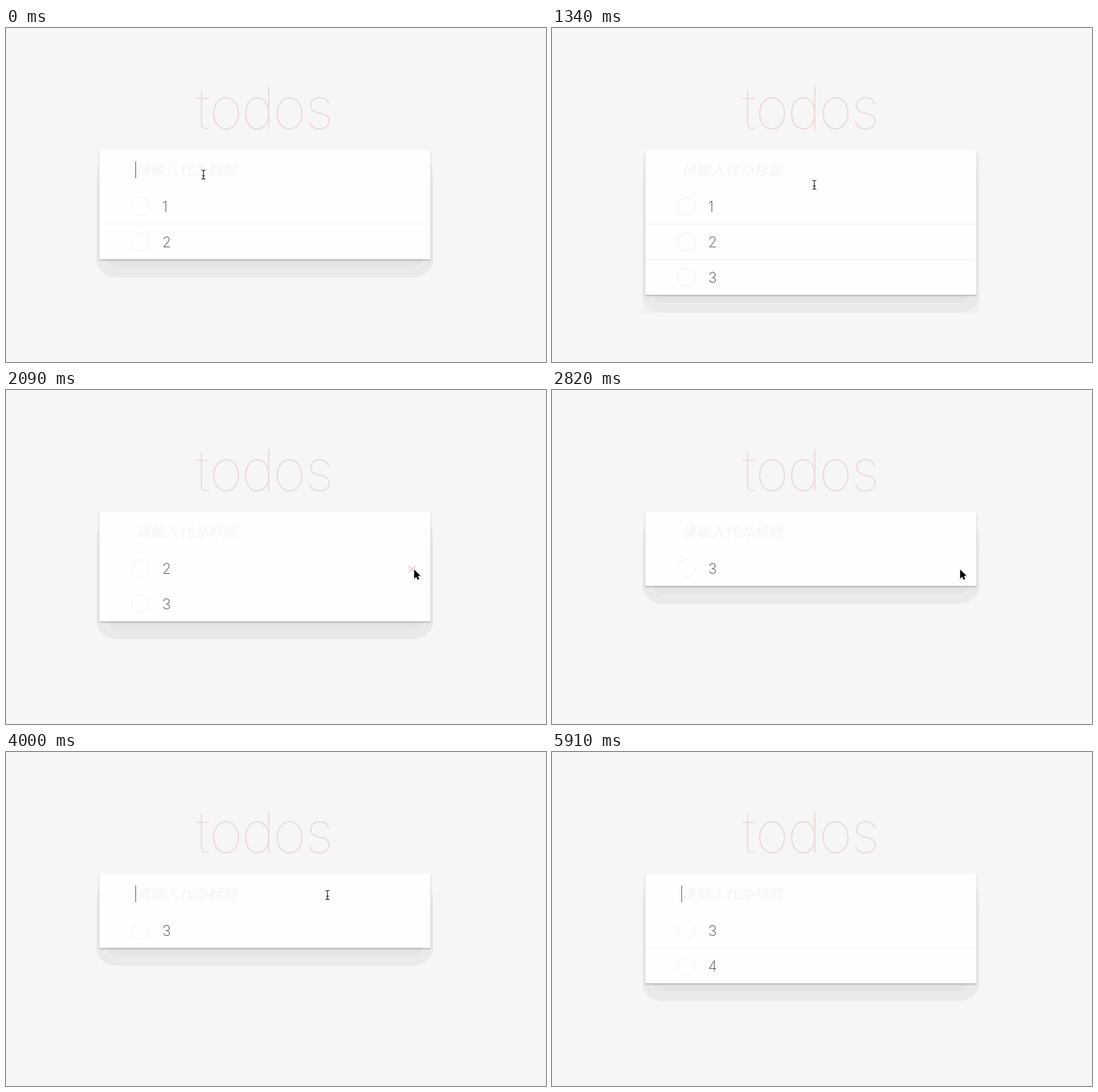
Recreate the animation shown at these times as an HTML page. Size 897 by 556 pixels, loop 6180 ms.

```html
<!DOCTYPE html>
<html lang="zh">
<head>
<meta charset="utf-8">
<title>todos</title>
<style>
  html, body { margin: 0; width: 100%; height: 100%; overflow: hidden; background: #f6f6f6; }
  svg { display: block; font-family: Inter, Roboto, sans-serif; }
  #title { font-size: 96px; font-weight: 130; fill: rgba(175, 47, 47, .14); text-anchor: middle; }
  #panel { fill: #fefefe; filter: drop-shadow(0 2px 1.5px rgba(0, 0, 0, .22)); }
  #hint { font: italic 100 24px "Noto Sans CJK SC", "Noto Sans CJK", sans-serif; }
  .digit { font-size: 24px; font-weight: 150; fill: #4d4d4d; }
  .row circle, #cross, #beam { fill: none; }
</style>
</head>
<body>
<svg width="897" height="556" viewBox="0 0 897 556">
  <defs>
    <linearGradient id="side" gradientUnits="userSpaceOnUse" x1="0" x2="0" y1="210" y2="265">
      <stop stop-color="#f3f3f3"/><stop offset="1" stop-color="#eaeaea"/>
    </linearGradient>
  </defs>
  <text id="title" x="327 365.5 419 471 520.5" y="168">todos</text>
  <rect id="halo" x="150" y="215" width="560" fill="#f0f0f0"/>
  <rect id="outer" x="150" y="210" width="560" rx="35" ry="30" fill="url(#side)"/>
  <rect id="inner" x="168" y="250" width="524" rx="20" ry="13" fill="#e4e4e4"/>
  <rect id="panel" x="155" y="203" width="550"/>
  <text id="hint" x="215" y="245">请输入代办标题</text>
  <text id="typed" class="digit" x="215" y="245"></text>
  <rect id="caret" y="222" width="1" height="28" fill="#4d4d4d"/>
  <g id="rows"></g>
  <path id="cross" d="M668.5 292.5l12 12m0-12l-12 12" stroke="#cd7571" stroke-width="1.1"/>
  <path id="beam" stroke="#000" stroke-width="1.1" stroke-linecap="round"
    d="M-3-7.5q2.6 0 3 1.5q.4-1.5 3-1.5M0-6V6M-3 7.5q2.6 0 3-1.5q.4 1.5 3 1.5M-2 2h4"/>
  <path id="arrow" d="M0 0v15l3.5-3.3 2.2 5 2.6-1.1-2.2-5h4.6z" stroke="#fff" stroke-width="1.6"
    paint-order="stroke" style="filter:drop-shadow(0 1px 1px rgba(0,0,0,.25))"/>
</svg>
<script>
const LOOP = 6180, FRAME = 147, BLINK = 585, TYPING = 300;
const ROW = 59, LIST_TOP = 267;
const FIRST_BLINK = 150 - BLINK, BLUR = 1770, FOCUS = 3550;
const HOVER_IN = 1350, HOVER_OUT = 2820, LEAVE = 4870, GONE = 5010;

const tasks = [
  { label: 1, born: -LOOP, died: 2090 },
  { label: 2, born: -LOOP, died: 2680 },
  { label: 3, born: 600, died: LOOP },
  { label: 4, born: 4440, died: LOOP },
];
const home = { x: 328, y: 244 };
const moves = [
  { start: 1050, end: 1790, x: 678, y: 299 },
  { start: 2880, end: 3400, x: 534, y: 238 },
  { start: 4440, end: LEAVE, x: 852, y: 522 },
];

const $ = id => document.getElementById(id);
const clamp = v => Math.min(1, Math.max(0, v));
const smooth = v => v * v * (3 - 2 * v);
const latest = (times, t) => Math.max(-LOOP, ...times.filter(time => time <= t));

function set(id, attributes) {
  for (const name in attributes) $(id).setAttribute(name, attributes[name]);
}

function pointerAt(t) {
  const sampled = Math.floor(t / FRAME) * FRAME;
  return moves.reduce((p, m) => {
    const k = smooth(clamp((sampled - m.start) / (m.end - m.start)));
    return { x: p.x + (m.x - p.x) * k, y: p.y + (m.y - p.y) * k };
  }, home);
}

function caretOn(t) {
  const edits = tasks.flatMap(task => [task.born - TYPING, task.born]);
  const restart = latest([FIRST_BLINK, FOCUS, ...edits], t);
  const focused = t < BLUR || t >= FOCUS;
  return focused && Math.floor((t - restart) / BLINK) % 2 === 0;
}

function rowMarkup(label, index, fresh) {
  const y = LIST_TOP + index * ROW;
  const line = index ? `<rect x="155" y="${y}" width="550" height="1" fill="${fresh ? '#ededed' : '#f4f4f4'}"/>` : '';
  return `<g class="row">${line}<circle cx="223" cy="${y + 30}" r="15" stroke="${fresh ? '#ebebeb' : '#f1f1f1'}"/>
    <text class="digit" x="259.5" y="${y + 39}">${label}</text></g>`;
}

function draw(t) {
  const list = tasks.filter(task => task.born <= t && t < task.died);
  const draft = tasks.find(task => task.born - TYPING <= t && t < task.born);
  const lastBorn = latest(tasks.map(task => task.born), t);
  const lastDied = latest(tasks.map(task => task.died), t);
  const fresh = lastBorn > lastDied && t < LEAVE;
  const bottom = LIST_TOP + ROW * list.length;

  set('halo', { height: bottom + 30 - 215, opacity: fresh ? 1 : 0 });
  set('outer', { height: bottom + 30 - 210 });
  set('inner', { height: bottom + 13 - 250 });
  set('panel', { height: bottom - 203 });
  set('hint', { fill: draft ? 'none' : fresh && caretOn(t) ? '#eeeeee' : '#f4f4f4' });
  $('typed').textContent = draft ? draft.label : '';
  set('caret', { x: draft ? 228 : 215, opacity: caretOn(t) ? 1 : 0 });
  $('rows').innerHTML = list.map((task, i) => rowMarkup(task.label, i, fresh)).join('');

  // The delete button fades in again after each removal.
  const hovered = t >= HOVER_IN && t < HOVER_OUT;
  const fade = clamp((t - Math.max(HOVER_IN, lastDied)) / 300);
  set('cross', { opacity: hovered ? .5 + .5 * fade : 0 });

  const { x, y } = pointerAt(t);
  const shape = t >= GONE ? '' : y < LIST_TOP ? 'beam' : 'arrow';
  for (const id of ['beam', 'arrow']) {
    set(id, { transform: `translate(${x} ${y})`, visibility: id === shape ? 'visible' : 'hidden' });
  }
}

function tick() {
  draw(performance.now() % LOOP);
  requestAnimationFrame(tick);
}
tick();
</script>
</body>
</html>
```
